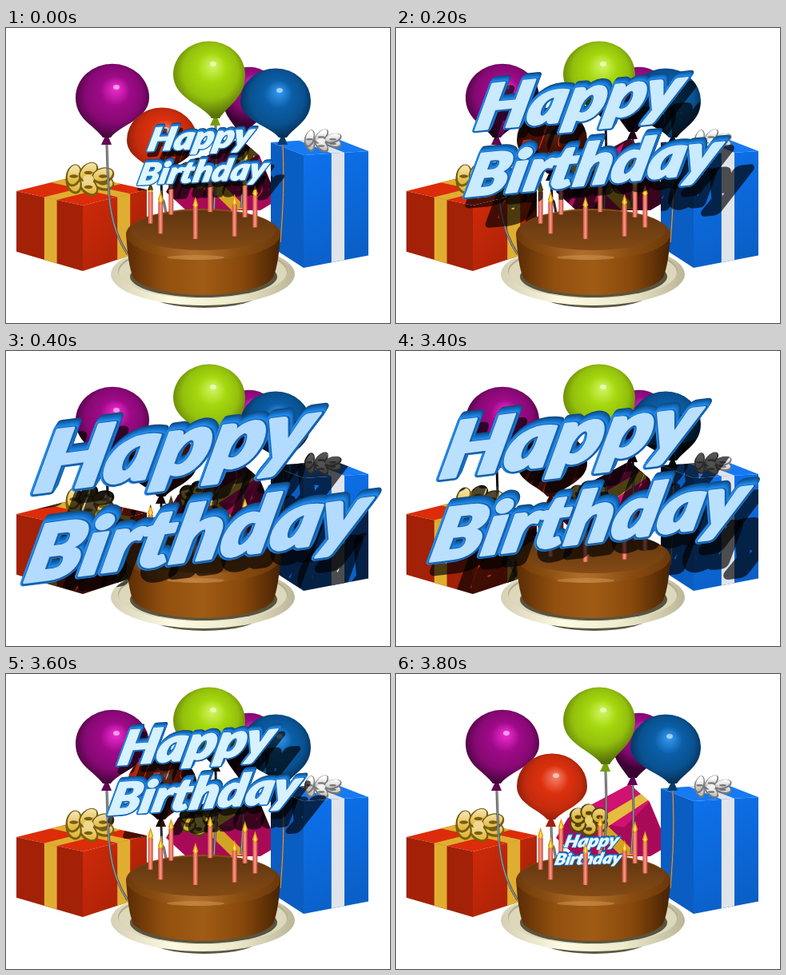
An HTML page with a canvas for the animation above (4800 ms loop, 480 by 369 pixels).

```html
<!DOCTYPE html>
<html lang="en">
<head>
<meta charset="utf-8">
<title>Happy Birthday</title>
<style>
  html, body { margin: 0; width: 100%; height: 100%; overflow: hidden; background: #fff; }
  canvas { display: block; }
</style>
</head>
<body>
<canvas id="stage" width="480" height="369" aria-label="Happy Birthday"></canvas>
<script>
const ctx = document.getElementById('stage').getContext('2d');
const TAU = Math.PI * 2;
const lerp = (a, b, u) => a.map((v, i) => v + (b[i] - v) * u);
const down = ([x, y], h) => [x, y + h];

function poly(fill, ...points) {
  ctx.beginPath();
  points.forEach(p => ctx.lineTo(...p));
  ctx.closePath();
  ctx.fillStyle = fill;
  ctx.fill();
}

function oval(fill, x, y, rx, ry, turn = 0) {
  ctx.beginPath();
  ctx.ellipse(x, y, rx, ry, turn, 0, TAU);
  ctx.fillStyle = fill;
  ctx.fill();
}

function blend(line, ...colors) {
  const g = line.length > 4 ? ctx.createRadialGradient(...line) : ctx.createLinearGradient(...line);
  colors.forEach((c, i) => g.addColorStop(i / (colors.length - 1), c));
  return g;
}

const tone = (hue, sat, light) => `hsl(${hue} ${sat}% ${light}%)`;

function string(x, y, endX, endY) {
  for (const [color, width] of [['#555', 3], ['#aaa', 1]]) {
    ctx.beginPath();
    ctx.moveTo(x, y);
    ctx.bezierCurveTo(x + 2, y + 55, x, endY - 40, endX, endY);
    ctx.strokeStyle = color;
    ctx.lineWidth = width;
    ctx.stroke();
  }
}

function balloon(x, y, r, neckX, neckY, hue, light, endX, endY) {
  const h = neckY - y;
  poly(tone(hue, 90, light - 10), [neckX, neckY - 6], [neckX + 6, neckY + 9], [neckX - 7, neckY + 9]);
  ctx.beginPath();
  ctx.ellipse(x, y, r, r * .92, 0, Math.PI, TAU);
  ctx.bezierCurveTo(x + r, y + h * .55, neckX + 15, neckY - h * .3, neckX + 5, neckY);
  ctx.lineTo(neckX - 5, neckY);
  ctx.bezierCurveTo(neckX - 15, neckY - h * .3, x - r, y + h * .55, x - r, y);
  ctx.fillStyle = blend([x + 5, y - 12, 1, x, y, r * 1.15],
    ...[26, 3, -2, -18].map(d => tone(hue, 88, light + d)));
  ctx.fill();
  oval('#fff8', x + 5, y - 13, 4, 3);
  string(neckX, neckY + 9, endX, endY);
}

function bow(x, y, w, h, hue, sat, light) {
  const dark = tone(hue, sat, light - 28);
  for (let i = 0; i < 6; i++) {
    const a = (i + .5) * TAU / 6;
    const px = x + Math.cos(a) * w * .62, py = y + Math.sin(a) * h * .5;
    oval(dark, px, py, w * .42, h * .55, a / 2);
    oval(blend([px, py - h / 2, px, py + h / 2], tone(hue, sat, light + 25), tone(hue, sat, light)),
      px, py - 1, w * .36, h * .42, a / 2);
    oval(dark, px, py + 1, w * .16, h * .12);
  }
  oval(tone(hue, sat, light + 20), x, y, w * .2, h * .3);
}

// Box given by the left, front and right corners of its lid; strips run from u to v along an edge
function box(left, front, right, h, hue, sat, light, ribbon, strips) {
  const back = [left[0] + right[0] - front[0], left[1] + right[1] - front[1]];
  const side = h * .925;
  const wall = (fill, a, b, u, v) => {
    const drop = t => a === front ? h + (side - h) * t : side + (h - side) * t;
    const p = lerp(a, b, u), q = lerp(a, b, v);
    poly(fill, p, q, down(q, drop(v)), down(p, drop(u)));
  };
  poly(tone(hue, sat, light + 3), left, front, right, back);
  wall(tone(hue, sat, light - 9), left, front, 0, 1);
  wall(blend([...front, ...down(right, h)], tone(hue, sat, light), tone(hue, sat, light - 9)), front, right, 0, 1);
  for (const [onLeft, u, v] of strips) {
    const [a, b, c, d] = onLeft ? [left, front, back, right] : [front, right, left, back];
    poly(ribbon, lerp(a, b, u), lerp(a, b, v), lerp(c, d, v), lerp(c, d, u));
    wall(ribbon, a, b, u, v);
  }
}

function gifts() {
  box([13, 204], [96, 222], [176, 202], 82, 10, 92, 42, '#dfae30', [[false, .54, .74], [true, .42, .61]]);
  bow(103, 189, 34, 18, 45, 75, 55);

  poly('#a90a58', [292, 138], [317, 160], [340, 215], [318, 228], [225, 228], [200, 205], [215, 180]);
  poly('#d01270', [292, 138], [317, 160], [285, 192], [217, 178]);
  poly('#d3a324', [229, 176], [244, 170], [302, 226], [282, 228]);
  poly('#e5bd3c', [243, 187], [306, 150], [315, 158], [257, 196]);
  bow(241, 183, 25, 20, 46, 75, 47);

  box([331, 143], [372, 159], [453, 154], 141, 213, 90, 49, '#dfe4ec', [[false, .43, .63]]);
  bow(394, 141, 27, 11, 0, 0, 75);
}

function balloons() {
  balloon(304, 80, 34, 296, 130, 309, 30, 294, 225);
  balloon(133, 87, 46, 126, 137, 309, 30, 152, 283);
  balloon(254, 58, 45, 262, 113, 75, 42, 260, 228);
  balloon(337, 91, 44, 346, 137, 208, 32, 343, 268);
  balloon(195, 140, 44, 194, 182, 10, 43, 200, 232);
}

function cake() {
  oval('#5b5744', 248, 331, 70, 19);
  oval(blend([131, 0, 361, 0], '#d5d0b4', '#fffbe4', '#eeeacc', '#bcb698'), 246, 308, 115, 39);
  oval('#b5af92', 246, 304, 106, 33);
  oval('#ddd8bb', 246, 306, 105, 32);
  oval('#59543f', 247, 311, 92, 26);
  ctx.beginPath();
  ctx.moveTo(150, 256);
  ctx.bezierCurveTo(152, 285, 154, 300, 159, 312);
  ctx.bezierCurveTo(180, 341, 313, 341, 334, 312);
  ctx.bezierCurveTo(339, 300, 342, 280, 343, 256);
  ctx.fillStyle = blend([150, 0, 343, 0], '#5a2b04', '#92500f', '#a05c16', '#88490b', '#472203');
  ctx.fill();
  oval(blend([235, 290, 5, 245, 258, 100], '#b06e2a', '#8a4d10', '#6a370a'), 246.5, 258, 96.5, 32);
  oval(blend([0, 228, 0, 280], '#5f3510', '#854b15'), 246.5, 253, 90, 25);
  oval('#d0965580', 237, 287, 36, 3);
}

// Eight candles on a ring, those in front or at the back
function candles(inFront) {
  for (let i = 0; i < 8; i++) {
    const a = .14 - TAU / 8 * (8 - i);
    if (Math.sin(a) > .5 !== inFront) continue;
    const x = 246 + 66 * Math.cos(a), y = 247 + 17 * Math.sin(a), top = y - 53;
    ctx.fillStyle = blend([x - 3, 0, x + 3, 0], '#c94c40', '#ff9c85', '#b84238');
    ctx.fillRect(x - 3, top + 13, 6, 40);
    poly('#e59a18', [x, top], [x + 3.5, top + 11], [x, top + 16], [x - 3.5, top + 11]);
    poly('#ffe760', [x, top + 4], [x + 1.5, top + 11], [x, top + 14], [x - 1.5, top + 11]);
  }
}

// The lettering flies up and towards the viewer in five steps
const heights = [217, 154, 114, 128, 160, 178];

function eachWord(n, dx, dy, paint) {
  const s = Math.min(1, .195 + .182 * n);
  const x = 242 - 156 * s - 54 * s * s + dx * s, y = heights[n] + dy * s;
  for (const [word, size, wx, wy] of [['Happy', 122, x, y], ['Birthday', 113, x - 12, y + 112 * s]]) {
    ctx.save();
    ctx.transform(s, -.13 * s * s, -.2 * s, .87 * s, wx, wy);
    ctx.font = `italic 900 ${size}px Lato, "Open Sans", sans-serif`;
    ctx.lineJoin = 'round';
    paint(word, s);
    ctx.restore();
  }
}

function shadow(n, dx, dy) {
  ctx.globalCompositeOperation = 'source-atop';
  ctx.strokeStyle = '#000a';
  ctx.lineWidth = 18;
  eachWord(n, dx, dy, word => ctx.strokeText(word, 0, 0));
  ctx.globalCompositeOperation = 'source-over';
}

function lettering(n) {
  eachWord(n, 0, 0, (word, s) => {
    const edge = (color, width, x, y) => {
      ctx.strokeStyle = color;
      ctx.lineWidth = width;
      ctx.strokeText(word, x, y);
    };
    const face = tone(190 + 18 * s, 100, 95 - 10 * s * s);
    for (let k = 8; k >= 0; k--) edge(tone(209, 80, 52 - 3 * k), 11, k * .4, -k * 1.1);
    edge('#1561ad', 8, 1, 1);
    edge(face, 4, 0, 0);
    ctx.fillStyle = face;
    ctx.fillText(word, 0, 0);
  });
}

function draw(n) {
  ctx.clearRect(0, 0, 480, 369);
  gifts();
  balloons();
  if (n) shadow(n, 42, 45);
  cake();
  candles(false);
  if (n) {
    candles(true);
    shadow(n, 8, 12);
  }
  lettering(n);
  if (!n) candles(true);
}

function stepAt(t) {
  const k = Math.floor(t / 100);
  return k < 34 ? Math.min(5, k + 1) : Math.max(0, 38 - k);
}

const start = performance.now();
function tick() {
  draw(stepAt((performance.now() - start) % 4800));
  requestAnimationFrame(tick);
}
tick();
</script>
</body>
</html>
```
